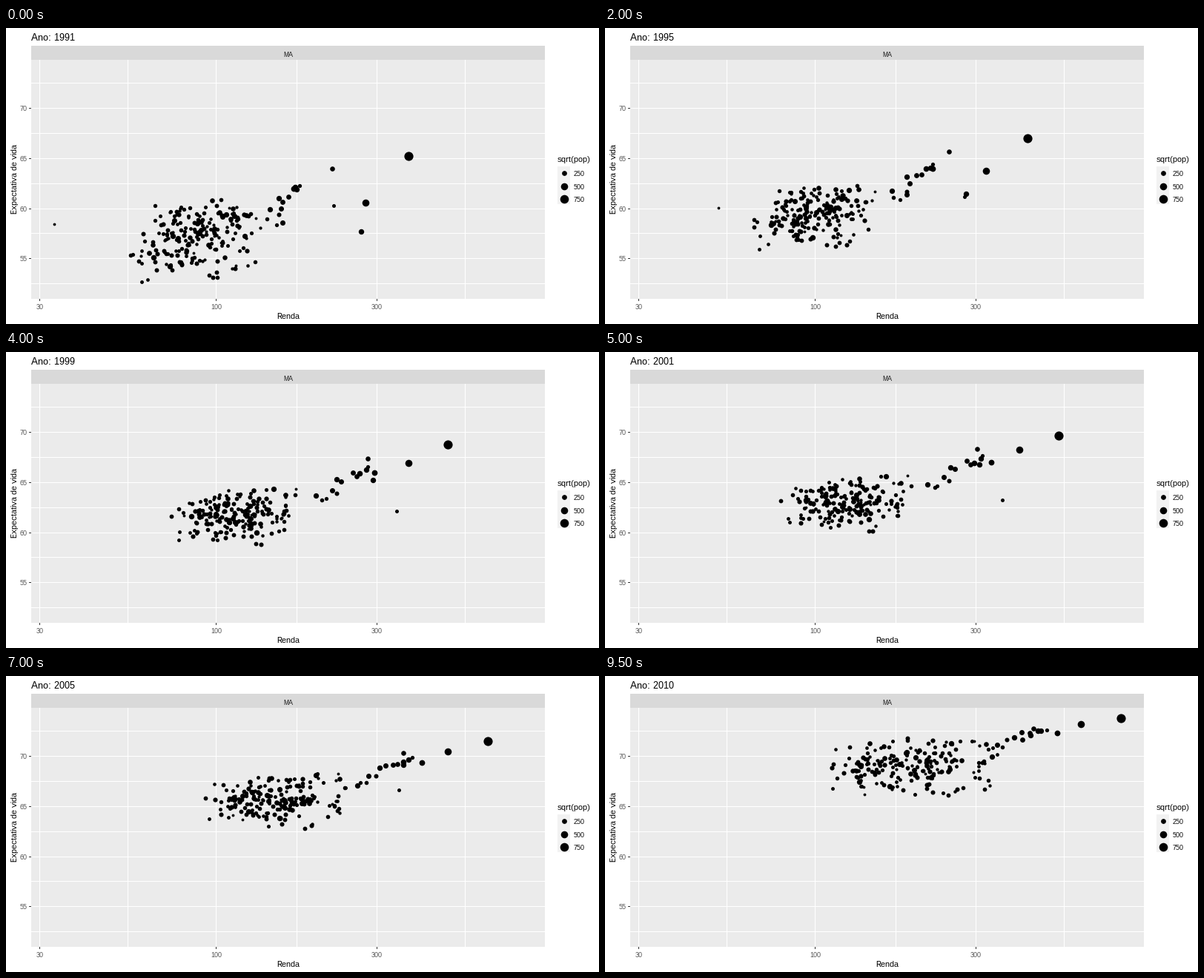
A matplotlib script that plays this animation: 800x400 px, repeating every 10 s.

```python
import numpy as np
import matplotlib.pyplot as plt
from matplotlib.animation import FuncAnimation
from matplotlib.patches import Rectangle

plt.rcParams.update({"font.family": "Liberation Sans", "text.hinting": "native",
                     "text.hinting_factor": 1, "toolbar": "None"})

W, H, DPI = 800, 400, 100
PX = 72 / DPI
YEARS = range(1991, 2011)
CENSUS = (1991, 2000, 2010)
LEFT, TOP, RIGHT, BOTTOM = 34, 43, 727, 366

fig = plt.figure(figsize=(W / DPI, H / DPI), dpi=DPI, facecolor="white")
ax = fig.add_axes([0, 0, 1, 1])
ax.set(xlim=(0, W), ylim=(H, 0))
ax.axis("off")


def box(x0, y0, x1, y1, color):
    ax.add_patch(Rectangle((x0, y0), x1 - x0, y1 - y0, fc=color, lw=0, antialiased=False))


def label(x, y, text, size, color="black", **kw):
    return ax.text(x, y, text, fontsize=size * PX, color=color, **kw)


def dots(x, y, radius):
    return ax.scatter(x, y, s=(2 * np.asarray(radius) * PX) ** 2, c="black", lw=0, zorder=3)


def x_pixel(income):
    return round(45 + 238 * np.log(income / 30) / np.log(100 / 30))


def y_pixel(years):
    return round(108.2 + 13.53 * (70 - years))


# Panel, facet strip, grid and ticks
box(LEFT, 24, RIGHT, TOP, "#D9D9D9")
box(LEFT, TOP, RIGHT, BOTTOM, "#EBEBEB")
for income in (30, 100, 300):
    x = x_pixel(income)
    box(x, TOP, x + 1, BOTTOM, "white")
    box(x, BOTTOM, x + 1, BOTTOM + 3, "#333333")
    label(x + 0.5, 380, income, 9, "#4D4D4D", ha="center")
for income in (30 * 100, 100 * 300, 300 * 1000):
    x = x_pixel(np.sqrt(income))
    box(x, TOP, x + 1, BOTTOM, "white")
for years in np.arange(52.5, 73, 2.5):
    y = y_pixel(years)
    box(LEFT, y, RIGHT, y + 1, "white")
    if years % 5 == 0:
        box(LEFT - 3, y, LEFT, y + 1, "#333333")
        label(29, y + 4, f"{years:.0f}", 9, "#4D4D4D", ha="right")

label(381, 39, "MA", 9, "#1A1A1A", ha="center")
label(380.5, 393, "Renda", 11, ha="center")
label(12, 204, "Expectativa de vida", 10.8, rotation=90, ha="center", va="center")
title = label(34, 17, "", 12.8)

# Size legend
label(744, 181, "sqrt(pop)", 11)
box(744, 187, 761, 238, "#F2F2F2")
for y, size, radius in ((195.5, 250, 3.4), (213.5, 500, 4.8), (230.5, 750, 5.8)):
    dots([752.5], [y], [radius])
    label(766, y + 4.5, size, 9)

rng = np.random.default_rng(21)


def follow(z, keep):
    """Normal noise that keeps a share of z."""
    return keep * z + np.sqrt(1 - keep ** 2) * rng.normal(size=z.size)


def bounded(z):
    return 2.4 * np.tanh(z / 2.2)


# Towns that stand apart: x, y at each census, then radius
leaders = np.array([
    (543, 173, 603, 119, 696, 57, 6.1),
    (485, 236, 550, 139, 642, 65, 4.8),
    (440, 190, 494, 138, 578, 71, 3.3),
    (479, 275, 497, 160, 574, 80, 3.7),
    (442, 240, 538, 212, 523, 97, 2.5),
    (65, 265, 262, 215, 350, 160, 1.9),
])

# Richer towns, strung along a rising arm
rank = np.linspace(0, 1, 13)
arm = []
for x, dx, y, dy in ((354, 42, 258, 48), (425, 85, 192, 46), (515, 92, 102, 36)):
    arm += [x + dx * rank + rng.normal(0, 5, rank.size),
            y - dy * rank + rng.normal(0, 8, rank.size)]
arm.append(rng.uniform(2.6, 3.9, rank.size))

# Crowd: correlated scatter around a drifting centre
CROWD = 198
income = rng.normal(size=CROWD)
life = follow(income, 0.3)
crowd = []
for x, dx, y, dy in ((264, 46, 285, 28), (321, 43, 215, 18.5), (415, 55, 122, 19.5)):
    crowd += [x + dx * bounded(income), y - dy * bounded(life)]
    income, life = follow(income, 0.75), follow(life, 0.65)
crowd.append(np.clip(rng.normal(2.65, 0.4, CROWD), 1.9, 3.7))

towns = np.vstack([leaders, np.transpose(arm), np.transpose(crowd)])
stops = towns[:, :6].reshape(-1, 3, 2)
points = dots(*stops[:, 0].T, towns[:, 6])


def update(frame):
    year = YEARS[frame]
    weights = [np.interp(year, CENSUS, basis) for basis in np.eye(3)]
    position = np.einsum("k,nkd->nd", weights, stops)
    points.set_offsets(np.round(position) + 0.5)
    title.set_text(f"Ano: {year}")
    return points, title


anim = FuncAnimation(fig, update, frames=len(YEARS), interval=500,
                     repeat=True, repeat_delay=0, blit=False)
plt.show()
```
